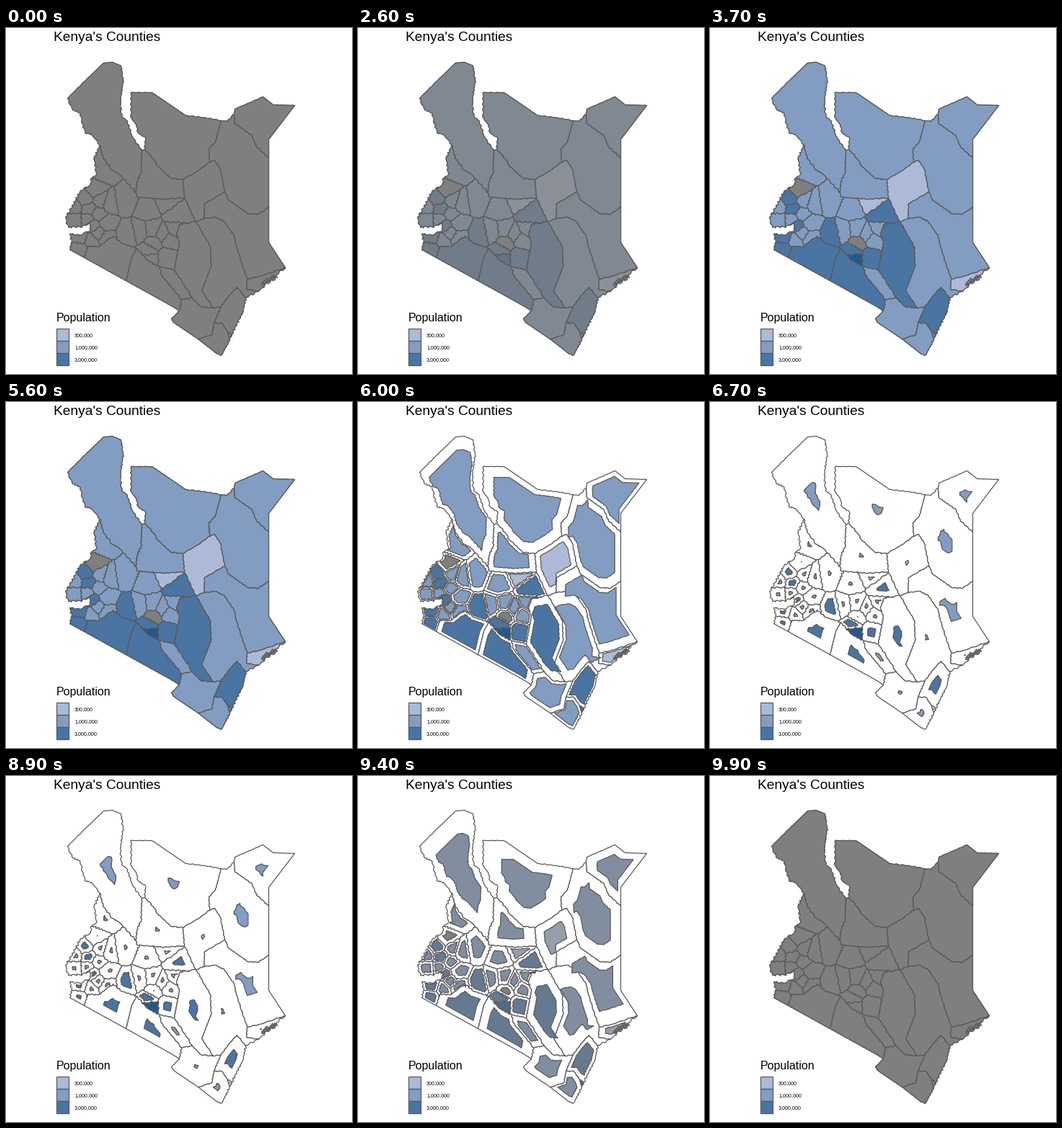
A matplotlib script that plays this animation: 480 px wide and 480 px high, repeating every 10 s.

```python
import math

import matplotlib.pyplot as plt
import numpy as np
from matplotlib.animation import FuncAnimation
from matplotlib.collections import PolyCollection
from matplotlib.colors import to_rgb
from matplotlib.patches import Rectangle
from matplotlib.path import Path

SIZE, DPI, FRAMES, INTERVAL = 480, 100, 100, 100
PX = 72 / DPI
LINE, GREY = "#595959", "#7f7f7f"
PALE, MID, DARK, DEEP = "#adbad7", "#829dc1", "#4a74a2", "#22598b"
WIDTH = 1.25 * PX

edges, links = {}, {}


def ragged(a, b, rough):
    """Split a straight line and shake it by a fixed field of noise."""
    a, b = np.array(a, float), np.array(b, float)
    n = max(1, math.ceil(math.hypot(*(b - a)) / 2.5))
    pts = a + np.linspace(0, 1, n + 1)[:, None] * (b - a)
    x, y = pts[1:-1].T
    pts[1:-1] += rough * np.c_[np.sin(0.9 * x + 1.7 * y),
                               np.sin(1.9 * x - 0.8 * y)]
    return pts


def border(rough, *pts):
    """Add a polyline to the map; equal points join up."""
    for a, b in zip(pts, pts[1:]):
        seg = ragged(a, b, rough)
        edges[a, b], edges[b, a] = seg, seg[::-1]
        links.setdefault(a, []).append(b)
        links.setdefault(b, []).append(a)


# Land borders
border(0.2, (85, 97), (108, 74), (135, 48), (147, 47), (159, 52))
border(0.2, (173, 89), (202, 89), (249, 121))
border(0.6, (249, 121), (276, 124), (298, 128), (306, 129), (316, 119))
border(0.2, (316, 119), (317, 112), (356, 95), (370, 106), (400, 107))
border(0, (400, 107), (364, 154), (364, 180), (364, 248), (364, 297),
       (387, 332))
border(0.2, (293, 452), (266, 431), (232, 408), (229, 403), (240, 392),
       (231, 386), (166, 350), (108, 318), (88, 307))
border(1, (117, 217), (118, 208), (125, 203), (122, 180), (130, 162),
       (118, 147), (109, 145), (102, 117), (92, 113), (85, 97))

# Shores
border(1, (159, 52), (162, 72), (158, 100), (160, 122), (168, 129),
       (174, 149), (188, 170), (192, 168), (193, 152), (183, 145),
       (180, 133), (173, 124), (173, 89))
border(1.2, (387, 332), (371, 345), (350, 365), (332, 374), (328, 394),
       (313, 424), (310, 431), (299, 453), (293, 452))
border(1.2, (88, 307), (91, 296), (88, 285), (102, 287), (117, 279),
       (116, 271), (101, 275), (86, 276), (82, 262), (90, 250), (102, 227),
       (117, 217))

# North and east
border(0.8, (130, 162), (134, 180), (147, 197), (156, 202), (180, 228),
       (182, 234))
border(0.8, (188, 170), (187, 200), (181, 213), (180, 228))
border(0.8, (192, 168), (204, 181), (209, 190), (228, 208), (245, 210))
border(0.5, (245, 210), (262, 200), (282, 186), (281, 167), (290, 158),
       (298, 128))
border(0.5, (316, 119), (317, 132), (341, 149), (347, 164), (364, 180))
border(0.5, (282, 186), (289, 183), (297, 196), (303, 227), (308, 238),
       (335, 257), (350, 258), (364, 248))
border(0.5, (303, 227), (275, 243), (274, 264), (290, 262), (302, 268),
       (316, 288), (319, 303), (334, 348), (352, 344), (387, 332))
border(0.5, (334, 348), (333, 362), (350, 365))
border(0.6, (245, 210), (247, 235), (260, 262), (263, 268), (274, 264))
border(0.5, (182, 234), (219, 237), (247, 235))

# South
border(0.5, (263, 268), (283, 303), (284, 330), (271, 364), (287, 388),
       (298, 386), (309, 371), (320, 359), (332, 374))
border(0.7, (263, 268), (241, 272), (236, 285), (240, 298), (233, 335),
       (258, 374), (270, 386), (287, 388))
border(0.7, (213, 331), (215, 342), (243, 376), (240, 392))
border(0.5, (243, 376), (258, 374))
border(0.5, (298, 386), (288, 409), (285, 425), (266, 431))
border(0.5, (288, 409), (299, 409), (307, 421), (313, 424))
border(0.5, (307, 421), (310, 431))
border(0.4, (166, 350), (174, 317), (181, 305))
border(0.7, (181, 305), (196, 322), (213, 331), (233, 335))
border(0.8, (181, 305), (160, 298), (148, 288), (128, 303), (113, 302),
       (108, 318))

# Fill, people (in pixels of final area), county centres
GROUPS = [
    (GREY, 0.1, [(123, 225), (205, 298), (310, 426)]),
    (PALE, 18, [(268, 225), (222, 241)]),
    (PALE, 0.5, [(352, 354)]),
    (MID, 400, [(142, 131), (325, 193), (335, 286)]),
    (MID, 135, [(231, 148), (355, 130)]),
    (MID, 50, [(291, 432), (233, 352)]),
    (MID, 18, [(301, 328), (210, 213), (262, 403), (196, 253), (163, 240),
               (134, 197), (130, 239), (143, 243), (95, 249), (95, 265),
               (113, 264), (127, 258), (138, 271), (138, 290), (128, 284),
               (117, 295), (186, 281), (202, 279), (217, 286), (226, 293),
               (234, 279)]),
    (DARK, 230, [(261, 326), (312, 390), (202, 345), (148, 316), (168, 285)]),
    (DARK, 115, [(221, 317), (235, 259), (199, 309)]),
    (DARK, 60, [(110, 237), (114, 251)]),
    (DARK, 25, [(120, 273), (103, 291), (101, 305)]),
    (DEEP, 900, [(200, 318)]),
]
SITES = [(np.array(p, float), to_rgb(fill), people)
         for fill, people, spots in GROUPS for p in spots]


def faces():
    """Walk round every enclosed region of the border network."""
    for v, near in links.items():
        near.sort(key=lambda w: math.atan2(w[1] - v[1], w[0] - v[0]))
    seen = set()
    for start in edges:
        if start in seen:
            continue
        ring, (u, v) = [], start
        while (u, v) not in seen:
            seen.add((u, v))
            ring.append(edges[u, v][:-1])
            near = links[v]
            u, v = v, near[near.index(u) - 1]
        yield np.vstack(ring)


def nearer(ring, site, other):
    """Cut off the part of a ring that lies closer to the other site."""
    side = (ring - (site + other) / 2) @ (other - site)
    out = []
    for i, p in enumerate(ring):
        j = (i + 1) % len(ring)
        if side[i] <= 0:
            out.append(p)
        if side[i] * side[j] < 0:
            out.append(p + (ring[j] - p) * side[i] / (side[i] - side[j]))
    return np.array(out)


def roughen(ring):
    """Shake only the long cuts; borders are ragged already."""
    out = []
    for p, q in zip(ring, np.roll(ring, -1, axis=0)):
        out.append(ragged(p, q, 0.9)[:-1] if math.hypot(*(q - p)) > 6 else [p])
    return np.vstack(out)


def area_centre(p):
    q = np.roll(p, -1, axis=0)
    cross = p[:, 0] * q[:, 1] - q[:, 0] * p[:, 1]
    area = cross.sum() / 2
    return area, ((p + q) * cross[:, None]).sum(axis=0) / (6 * area or 1)


shapes, centres, fills, scales = [], [], [], []
for face in faces():
    if area_centre(face)[0] <= 0:
        continue
    path = Path(face)
    inside = [s for s in SITES if path.contains_point(s[0])]
    # Neighbours in one region share it by nearest centre
    for site, fill, people in inside:
        ring = face
        for other, _, _ in inside:
            if other is not site:
                ring = nearer(ring, site, other)
        ring = roughen(ring)
        area, centre = area_centre(ring)
        shapes.append(ring)
        centres.append(centre)
        fills.append(fill)
        scales.append(min(0.97, math.sqrt(people / area)))
fills = np.array(fills)
grey = np.array(to_rgb(GREY))

plt.rcParams["font.family"] = "Liberation Sans"
fig = plt.figure(figsize=(SIZE / DPI, SIZE / DPI), dpi=DPI, facecolor="white")
ax = fig.add_axes([0, 0, 1, 1])
ax.set(xlim=(-0.5, SIZE - 0.5), ylim=(SIZE - 0.5, -0.5))
ax.axis("off")


def polygons(rings, fill, z):
    return ax.add_collection(PolyCollection(
        rings, facecolors=fill, edgecolors=LINE, linewidths=WIDTH,
        joinstyle="round", snap=False, zorder=z))


polygons(shapes, "white", 1)
counties = polygons(shapes, fills, 2)

rng = np.random.default_rng(4)
turn = np.linspace(0, 2 * np.pi, 9)[:-1]
islands = []
for x in np.linspace(356, 374, 8):
    y = 353 - 0.45 * (x - 356) + rng.uniform(-3, 3)
    r = rng.uniform(0.8, 3, 8)
    islands.append(np.c_[x + r * np.cos(turn), y + r * np.sin(turn)])
polygons(islands, GREY, 3)


def label(x, y, text, px):
    ax.text(x, y, text, fontsize=px * PX, va="baseline")


label(65, 17.5, "Kenya's Counties", 19.2)
label(69, 406.5, "Population", 16)
for i, (text, fill) in enumerate([("300,000", PALE), ("1,000,000", MID),
                                  ("3,000,000", DARK)]):
    y = 417 + 17 * i
    ax.add_patch(Rectangle((70, y), 17, 17, fc=fill, ec=LINE, lw=WIDTH,
                           snap=False))
    label(94.5, y + 11, text, 7.2)


def ease(step):
    """Cubic in-out over twelve steps."""
    t = min(max((step + 1) / 12, 0), 1)
    return 4 * t ** 3 if t < 0.5 else 1 - 4 * (1 - t) ** 3


def tint(amount):
    """Only the middle of the fade is visible."""
    if amount < 0.2:
        return 0
    return amount if amount < 0.6 else 1


def draw(n):
    back = ease(n - 89)
    blue = tint(ease(n - 22) - back)
    shrink = ease(n - 56) - back
    counties.set_verts([c + (p - c) * (1 + (s - 1) * shrink)
                        for p, c, s in zip(shapes, centres, scales)])
    counties.set_facecolor(grey + (fills - grey) * blue)
    return [counties]


anim = FuncAnimation(fig, draw, frames=FRAMES, interval=INTERVAL,
                     repeat=True, repeat_delay=0)
plt.show()
```
